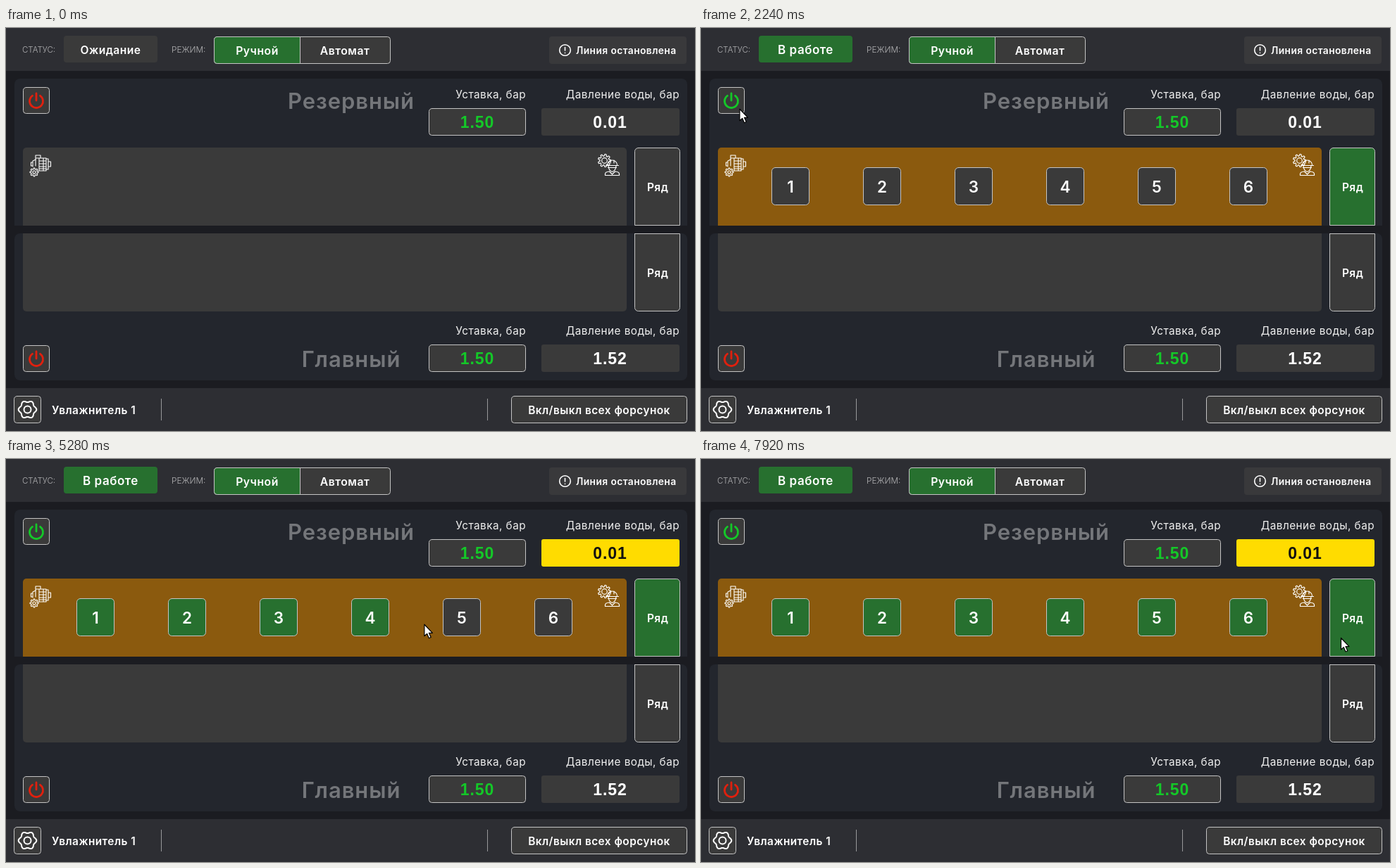
Write an HTML page with a canvas that moves like this. It is 978 by 573 pixels and loops after 8 s.

```html
<!DOCTYPE html>
<html lang="ru">
<head>
<meta charset="utf-8">
<title>Увлажнитель</title>
<style>
  html, body { margin: 0; width: 100%; height: 100%; overflow: hidden; background: #1b1c21; }
  canvas { display: block; width: 978px; height: 573px; }
</style>
</head>
<body>
<canvas id="stage" width="978" height="573"></canvas>
<script>
const ctx = document.getElementById('stage').getContext('2d');
const LOOP = 8000, STEP = 80;
const UI = 'Inter, "Open Sans", sans-serif';
const NUM = '"Liberation Sans", Arial, sans-serif';
const C = {
  back: '#1b1c21', bar: '#2d2e33', panel: '#23262d', box: '#3a3a3a', line: '#c4c4c4',
  green: '#27702f', amber: '#8b5a0e', yellow: '#ffdc00', on: '#14c828', off: '#e0200e',
  title: '#74767a', white: '#fff'
};

// Times of the clicks, in ms
const POWER_AT = 2080, ALARM_AT = 4000;
const NOZZLES_AT = [3360, 3920, 4560, 5040, 5600, 6320];

// Pointer path: time, x, y
const PATH = [
  [1120, 330, 580], [1760, 53, 112], [2160, 53, 112], [3040, 115, 230], [3440, 115, 230],
  [3840, 252, 232], [4000, 252, 232], [4480, 406, 231], [4640, 398, 231], [4960, 517, 233],
  [5080, 517, 233], [5440, 648, 236], [5680, 648, 236], [6160, 766, 233], [6400, 766, 233],
  [7200, 908, 254], [8000, 908, 254]
];

function box(x, y, w, h, fill, border, r = 4) {
  ctx.beginPath();
  if (border) ctx.roundRect(x + .5, y + .5, w - 1, h - 1, r);
  else ctx.roundRect(x, y, w, h, r);
  ctx.fillStyle = fill;
  ctx.fill();
  if (border) {
    ctx.strokeStyle = border;
    ctx.lineWidth = 1;
    ctx.stroke();
  }
}

function text(s, x, cy, size, { color = C.white, weight = 600, align = 'center', gap = .03, font = UI } = {}) {
  ctx.font = `${weight} ${size}px ${font}`;
  ctx.letterSpacing = size * gap + 'px';
  ctx.textAlign = align;
  ctx.fillStyle = color;
  ctx.fillText(s, x, cy + size * .36);
}

function pen(width, color = C.white) {
  ctx.lineWidth = width;
  ctx.strokeStyle = color;
  ctx.lineCap = ctx.lineJoin = 'round';
}

function circle(x, y, r) {
  ctx.beginPath();
  ctx.arc(x, y, r, 0, Math.PI * 2);
  ctx.stroke();
}

function path(d) { ctx.stroke(new Path2D(d)); }

// Closed ring with n waves; a high sharpness squares them into teeth
function gear(x, y, r, depth, n, sharp = 1) {
  ctx.beginPath();
  for (let i = 0; i < 120; i++) {
    const a = i / 120 * Math.PI * 2;
    const wave = Math.max(-1, Math.min(1, sharp * Math.cos(n * a)));
    const d = r + depth * wave;
    ctx.lineTo(x + d * Math.cos(a), y + d * Math.sin(a));
  }
  ctx.closePath();
  ctx.stroke();
}

function power(y, on) {
  box(24, y, 38, 38, C.box, C.line);
  pen(2.8, on ? C.on : C.off);
  ctx.beginPath();
  ctx.arc(43, y + 20, 9.5, -Math.PI / 2 + .62, Math.PI * 1.5 - .62);
  ctx.stroke();
  path(`M43 ${y + 9}v10`);
}

function motor() {
  pen(1.1);
  path('M42 181h7v4h-7zM42 185h15v18H46M42 185v11M47 189h10M47 193h10M47 197h10M47 200h10M47 185v18M53 185v18');
  path('M57 186h3v15h-3M60 190h3.500v7H60M42 187l-4 2v8M38 191h-2.500v5H38');
  gear(40, 205, 5.1, .9, 8, 2);
  circle(40, 205, 2);
}

function worker() {
  pen(1.2);
  gear(849.5, 188.5, 7.8, 1.3, 9, 2);
  circle(849.5, 188.5, 3.8);
  path('M853.500 195.500c0-10 14-10 14 0M851.500 195.500h18M858 188v4M863 188v4');
  path('M854.500 198.500h12M855 196q.500 7 5.500 8.500q5-1.500 5.500-8.500');
  path('M850.500 209.500v-2q0-3 6-3.500l4 4l4-4q6 .500 6 3.500v2z');
}

function unit(y, name, rowY, headY, valueY, labelY, pressure, on, alarm) {
  const upper = rowY < 280;
  const round = upper ? [5, 5, 0, 0] : [0, 0, 5, 5];
  box(12, y, 955, 209, C.panel, null, upper ? [8, 8, 0, 0] : 8);
  box(24, rowY, 857, 111, on ? C.amber : C.box, null, round);
  box(892, rowY, 65, 111, on ? C.green : C.box, C.line, round);
  text('Ряд', 925, rowY + 56, 15.5);
  power(headY - 20, on);
  text(name, 490, headY, 31, { color: C.title });
  const label = { weight: 400, align: 'right', color: '#f0f0f0' };
  text('Уставка, бар', 738, labelY, 15.3, label);
  text('Давление воды, бар', 956, labelY, 15.3, label);
  box(600, valueY, 138, 39, C.box, C.line);
  box(760, valueY, 196, 39, alarm ? C.yellow : C.box, null, 3);
  const num = { font: NUM, weight: 700, gap: .04 };
  text('1.50', 669, valueY + 20, 23, { ...num, color: C.on });
  text(pressure, 857.5, valueY + 20, 23, { ...num, color: alarm ? '#111' : C.white });
}

function header(on) {
  box(0, 0, 978, 61, C.bar, null, 0);
  const label = { weight: 300, align: 'left', gap: 0, color: '#b4b4b6' };
  text('СТАТУС:', 23, 31, 11.5, label);
  text('РЕЖИМ:', 235, 31, 11.8, label);
  box(82, 11, 133, 38, on ? C.green : C.box, null);
  if (on) text('В работе', 148.5, 31, 17);
  else text('Ожидание', 148.5, 31, 15.6);
  box(295, 12, 251, 39, C.box, C.line);
  box(295, 12, 123, 39, C.green, C.line, [4, 0, 0, 4]);
  text('Ручной', 356.5, 32, 15.8);
  text('Автомат', 481, 32, 15.8);
  box(771, 12, 195, 39, '#39393b', null);
  pen(1.6);
  circle(793.5, 31.5, 7.8);
  path('M793.5 27.500v4.500M793.5 35.200v.2');
  text('Линия остановлена', 809, 32, 13.8, { align: 'left' });
}

function footer() {
  box(0, 512, 978, 61, C.bar, null, 0);
  box(11, 523, 39, 39, C.box, C.line);
  pen(2);
  gear(30.5, 542.5, 11.6, 1.2, 6);
  circle(30.5, 542.5, 5);
  text('Увлажнитель 1', 65, 543, 15.4, { align: 'left' });
  box(220, 527, 1, 31, '#98989a', null, 0);
  box(683, 527, 1, 31, '#98989a', null, 0);
  box(717, 523, 250, 39, C.box, C.line);
  text('Вкл/выкл всех форсунок', 842, 543, 15.4);
}

function pointer(t) {
  const i = PATH.findIndex(p => p[0] > t);
  if (i < 1) return;
  const [t0, x0, y0] = PATH[i - 1], [t1, x1, y1] = PATH[i];
  const u = (t - t0) / (t1 - t0), k = u * u * (3 - 2 * u);
  ctx.save();
  ctx.translate(x0 + (x1 - x0) * k, y0 + (y1 - y0) * k);
  const arrow = new Path2D('M.5 .5V17L4.200 13.600L7 20L9.800 18.800L7 12.600H12Z');
  pen(1.2, '#000');
  ctx.fillStyle = C.white;
  ctx.fill(arrow);
  ctx.stroke(arrow);
  ctx.restore();
}

function draw(t) {
  const on = t >= POWER_AT;
  box(0, 0, 978, 573, C.back, null, 0);
  header(on);
  unit(72, 'Резервный', 170, 104, 114, 94, '0.01', on, t >= ALARM_AT);
  unit(292, 'Главный', 292, 471, 450, 430, '1.52', false, false);
  motor();
  worker();
  if (on) NOZZLES_AT.forEach((at, i) => {
    const x = 100 + i * 130;
    box(x, 198, 54, 54, t >= at ? C.green : C.box, C.line, 5);
    text(i + 1, x + 27, 226, 22.5, { gap: 0 });
  });
  footer();
  pointer(t);
}

const start = performance.now();
function tick() {
  const t = (performance.now() - start) % LOOP;
  draw(Math.floor(t / STEP) * STEP);
  requestAnimationFrame(tick);
}
tick();
</script>
</body>
</html>
```
